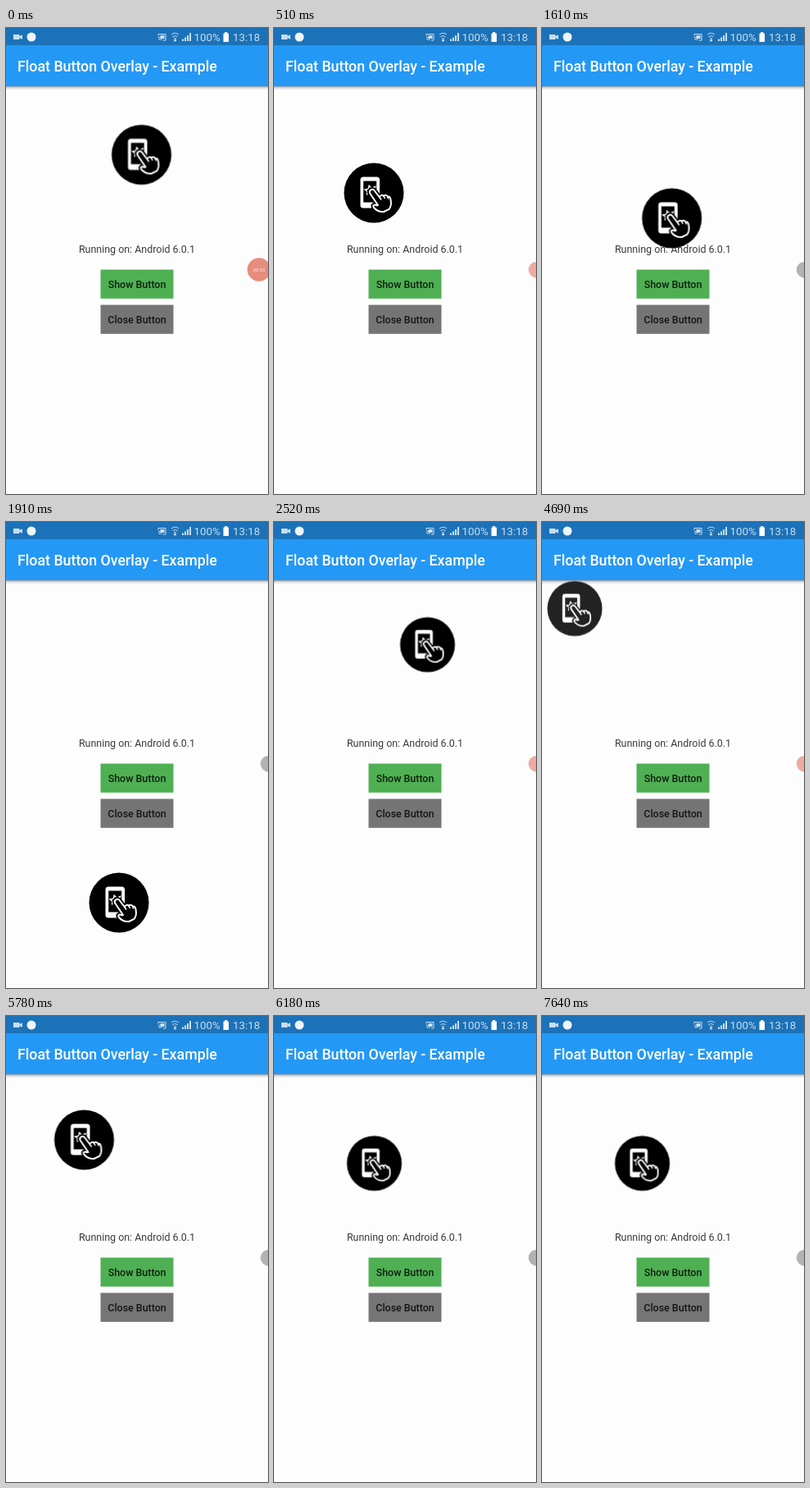
Write an HTML page that moves like this. It is 320 px wide and 568 px high and loops after 8000 ms.

```html
<!DOCTYPE html>
<html lang="en">
<head>
<meta charset="utf-8">
<title>Float Button Overlay</title>
<style>
  html, body { margin: 0; width: 100%; height: 100%; overflow: hidden; background: #fdfdfd; }
  svg { display: block; width: 320px; height: 568px; font-family: Roboto, sans-serif; }
  .title { font-size: 17.78px; font-weight: 500; fill: #fff; }
  .status { font-size: 13.3px; fill: #c9dff1; }
  .label { font-size: 12.44px; fill: #3a3a3a; text-anchor: middle; }
  .btn { font-weight: 500; fill: rgba(0, 0, 0, .82); }

  .drag, .press, .disc, .full, .half {
    animation: 8s linear infinite;
  }
  .drag { animation-name: drag; }
  .press { animation-name: press; animation-timing-function: step-end; }
  .disc { animation-name: disc; animation-timing-function: step-end; }
  .full { animation-name: full; animation-timing-function: step-end; }
  .half { animation-name: half; animation-timing-function: step-end; }

  @keyframes drag {
    0%       { transform: translate(165.5px, 154.5px); animation-timing-function: steps(3); }
    3.875%   { transform: translate(143px, 187px); animation-timing-function: steps(2); }
    6.375%   { transform: translate(122px, 201px); animation-timing-function: steps(1); }
    7.625%   { transform: translate(117px, 165px); animation-timing-function: steps(2); }
    10.125%  { transform: translate(140.5px, 83.5px); animation-timing-function: steps(1); }
    11.375%  { transform: translate(165.5px, 154.5px); }
    18.875%  { transform: translate(165.5px, 154.5px); animation-timing-function: steps(4); }
    23.875%  { transform: translate(138px, 464px); animation-timing-function: steps(4); }
    28.875%  { transform: translate(158px, 291px); animation-timing-function: steps(2); }
    31.5%    { transform: translate(187.5px, 149.5px); }
    39.125%  { transform: translate(187.5px, 149.5px); animation-timing-function: steps(4); }
    44.25%   { transform: translate(115px, 132px); }
    53.25%   { transform: translate(115px, 132px); animation-timing-function: steps(4); }
    58.625%  { transform: translate(40px, 105.5px); }
    68.375%  { transform: translate(40px, 105.5px); animation-timing-function: steps(3); }
    72.25%   { transform: translate(95.5px, 151px); animation-timing-function: steps(4); }
    77.25%, 100% { transform: translate(122.5px, 179.5px); }
  }
  @keyframes press {
    0%, 20.125%, 40.375%, 54.5%, 69.625% { transform: scale(1); }
    11.375%, 31.5%, 44.25%, 58.625%, 77.25%, 100% { transform: scale(.918); }
  }
  @keyframes disc {
    0%, 69.625%, 100% { fill: #000; stroke: #000; }
    58.625% { fill: #222; stroke: #222; }
  }
  @keyframes full {
    0% { visibility: visible; }
    1.25%, 100% { visibility: hidden; }
  }
  @keyframes half {
    0% { visibility: hidden; fill: #efab9f; }
    1.25%, 30.25% { visibility: visible; fill: #efab9f; }
    20.125%, 69.625%, 100% { visibility: visible; fill: #b2b2b2; }
  }
</style>
</head>
<body>
<svg viewBox="0 0 320 568">
  <defs>
    <linearGradient id="shade" x2="0" y2="1">
      <stop offset="0" stop-color="#000" stop-opacity=".4"/>
      <stop offset=".4" stop-color="#000" stop-opacity=".13"/>
      <stop offset="1" stop-color="#000" stop-opacity="0"/>
    </linearGradient>
    <path id="hand" d="M-4.500-3C-3-5-.5-4.500.5-3L7 5.500C7.500 2.500 11 2 12 4C13 2 16 2.200 17 5C19 3.800 20.300 6 20.600 9C21.500 14 21 17 18.500 19.800L12 23C6 23.500 3 21.500 0 18C-2 15 .5 13.500 3.500 15.300L5 15L-4.500 1C-5.500-.5-5.500-2-4.500-3Z"/>
  </defs>

  <rect width="320" height="568" fill="#fdfdfd"/>
  <rect y="71" width="320" height="5" fill="url(#shade)"/>
  <rect y="20" width="320" height="51" fill="#2498f5"/>
  <rect width="320" height="21" fill="#1c72b8"/>

  <!-- status bar -->
  <g fill="#c9dff1">
    <path d="M9 8h7.500v2l3.500-1.800v5.600l-3.500-1.800v2h-7.500z"/>
    <circle cx="31" cy="11" r="5.500" fill="#eef5fb"/>
    <rect x="265.500" y="6.500" width="6.500" height="10.500" rx=".5" fill="#fff"/>
    <rect x="267.200" y="5" width="3" height="2" fill="#fff"/>
    <path d="M215 16v-2.500h2v2.500zM218 16v-4.500h2v4.500zM221 16v-7h2v7zM224 16v-10h2v10z"/>
    <circle cx="206.500" cy="15" r="1.500"/>
    <rect x="188.500" y="9" width="5" height="4"/>
  </g>
  <g fill="none" stroke="#c9dff1">
    <path d="M186 9.500v-2h9v7.500h-3M186 11a4 4 0 0 1 4 4M186 13a2 2 0 0 1 2 2"/>
    <path d="M202 8q4.500-3.500 9 0M203.500 10.600q3-2.300 6 0M205 13q1.500-1.200 3 0"/>
  </g>
  <text class="status" x="229.500" y="15.800">100%</text>
  <text class="status" x="277" y="15.800">13:18</text>

  <text class="title" x="14" y="53">Float Button Overlay - Example</text>
  <text class="label" x="160" y="274.400">Running on: Android 6.0.1</text>

  <rect x="115.500" y="294.500" width="89" height="35.300" fill="#4fb053"/>
  <text class="label btn" x="160" y="317">Show Button</text>
  <rect x="115.500" y="337.500" width="89" height="35.300" fill="#757575"/>
  <text class="label btn" x="160" y="359.800">Close Button</text>

  <!-- recorder bubble -->
  <g class="full">
    <circle cx="309" cy="294.500" r="14.300" fill="#e68d7d"/>
    <text x="309" y="296.800" font-size="6" text-anchor="middle" fill="#fbe6e2">00:05</text>
  </g>
  <circle class="half" cx="320.500" cy="294.700" r="9.700"/>

  <!-- floating button -->
  <g class="drag">
    <g class="press">
      <circle class="disc" r="36.500" stroke-width="0"/>
      <rect x="-16.500" y="-19.500" width="23.500" height="38" rx="3.500" fill="#fff"/>
      <rect class="disc" x="-12.800" y="-14.500" width="16" height="26" stroke-width="0"/>
      <path d="M-8.500 2.500l.7-4-3-2.500 4-.7 1-4 2.800 3 4.500-1.700-1.800 3.600" fill="none" stroke="#fff" stroke-width="1.500"/>
      <use href="#hand" class="disc" stroke-width="5.500" stroke-linejoin="round"/>
      <use href="#hand" fill="none" stroke="#fff" stroke-width="2" stroke-linejoin="round"/>
      <path d="M7 5.500l2 3M12 4l1.500 3M17 5l.8 2.500" stroke="#fff" stroke-width="1.600"/>
    </g>
  </g>
</svg>
</body>
</html>
```
